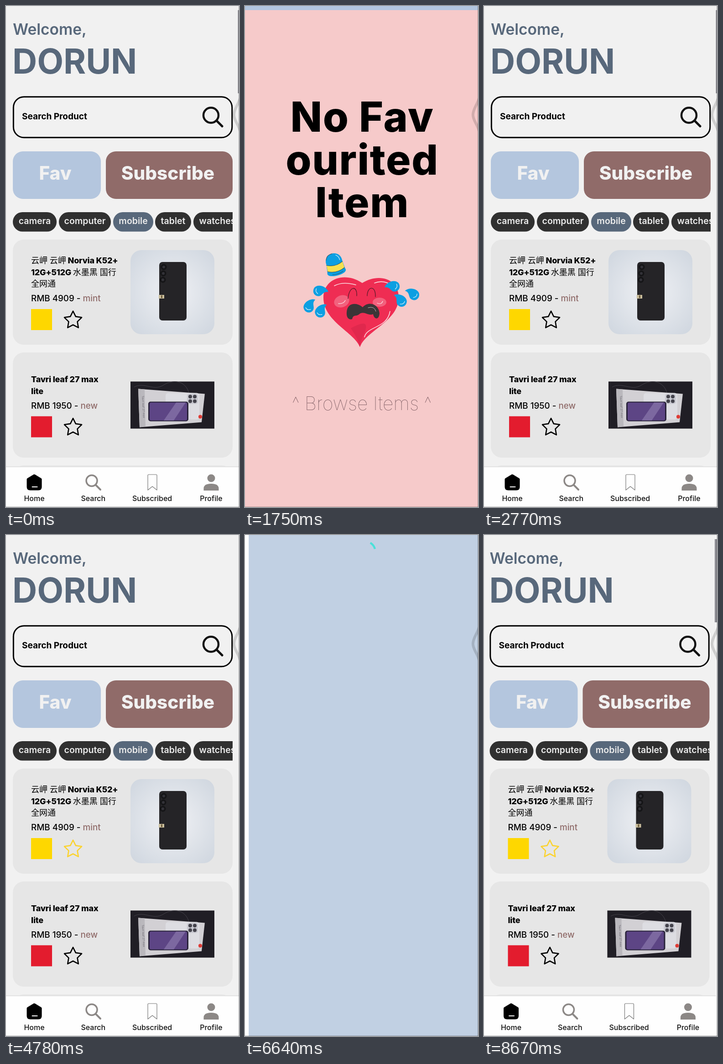
Animation, 511 px wide and 1096 px high, one loop 8740 ms. Source, as an HTML page:

```html
<!DOCTYPE html>
<html lang="en">
<head>
<meta charset="utf-8">
<style>
html, body { margin: 0; width: 100%; height: 100%; overflow: hidden; background: #fff; }
svg { display: block; font-family: Inter, "Noto Sans CJK SC", "Noto Sans CJK", sans-serif; }
.mid { text-anchor: middle; }
.headline { text-anchor: middle; letter-spacing: 1.5px; }
.title { font-size: 18px; font-weight: 800; letter-spacing: -.2px; }
.cjk { font-weight: 500; letter-spacing: 0; }
.price { font-size: 18.8px; font-weight: 500; }
.line { fill: none; stroke-linecap: round; stroke-linejoin: round; }
</style>
</head>
<body>
<svg id="stage" width="511" height="1096" viewBox="0 0 511 1096"></svg>
<script>
const LOOP = 8740, SLIDE = 51.1, SLIDE_MS = 450;

const rect = (x, y, w, h, r, fill, more = '') =>
  `<rect x="${x}" y="${y}" width="${w}" height="${h}" rx="${r}" fill="${fill}" ${more}/>`;
const text = (x, y, size, weight, fill, s, cls = '') =>
  `<text x="${x}" y="${y}" font-size="${size}" font-weight="${weight}" fill="${fill}" class="${cls}">${s}</text>`;
const path = (d, stroke, width) =>
  `<path class="line" d="${d}" stroke="${stroke}" stroke-width="${width}"/>`;
const fillPath = (d, fill) => `<path d="${d}" fill="${fill}"/>`;
const dot = (x, y, r, fill) => `<circle cx="${x}" cy="${y}" r="${r}" fill="${fill}"/>`;
const at = (x, y, s, more = '') => `<g transform="translate(${x} ${y}) ${more}">${s}</g>`;
const cjk = s => `<tspan class="cjk">${s}</tspan>`;

function star(id) {
  const points = Array.from({ length: 10 }, (_, i) => {
    const a = i * Math.PI / 5, r = i % 2 ? 10 : 20;
    return `${r * Math.sin(a)},${-r * Math.cos(a)}`;
  });
  return `<polygon id="${id}" class="line" points="${points.join(' ')}" stroke="#000" stroke-width="2.6"/>`;
}

const blackPhone = rect(0, 0, 184, 184, 24, 'url(#studio)') + rect(63, 26, 60, 128, 7, '#252427') +
  [37, 51, 65].map((y, i) => dot(73 - i, y, 6.5, '#151517') + dot(73 - i, y, 3, '#333238')).join('') +
  rect(62, 98, 12, 8, 0, '#c9bd9c') + rect(67, 99, 3, 6, 0, '#6b5a3a');

const boxedPhone = rect(0, 0, 184, 103, 0, '#201e25') +
  path('M8 12C30 0 50 22 72 8S120 -2 128 24', '#45424a', 1) +
  fillPath('M17 16L163 27L156 89L20 100Z', '#d2d0d4') + fillPath('M17 16L31 17L33 98L20 100Z', '#bab8bd') +
  rect(77, 25, 74, 58, 6, '#dddde2') + rect(124, 27, 24, 22, 5, '#c8c8d0') +
  [[131, 33], [141, 33], [131, 43], [141, 43]].map(([x, y]) => dot(x, y, 4, '#44434c')).join('') +
  rect(39, 44, 88, 43, 5, '#29233a') + rect(42, 46, 82, 39, 3, '#5d4585') +
  fillPath('M73 85L100 46H121L95 85Z', '#7c68a0') + dot(153, 77, 4, '#df3b35') +
  at(25, 31, text(0, 0, 6, 500, '#77747c', 'Tavri leaf 27 max'), 'rotate(87)');

const price = (x, y, amount, state) =>
  `<text class="price" x="${x}" y="${y}">RMB ${amount} - <tspan fill="#8f6b69">${state}</tspan></text>`;

function card(y, lines, amount, state, shop, id, photo) {
  const end = 52 + 25.5 * lines.length + (lines.length < 3 ? 13 : 0);
  const title = lines.map((s, i) =>
    `<text class="title" x="55" y="${end - 25.5 * (lines.length - i)}">${s}</text>`).join('');
  return at(0, y, rect(15, 0, 482, 230, 24, '#e6e6e6') + title + price(55, end + 6.5, amount, state) +
    rect(55, end + 23.5, 46, 46, 0, shop) + at(147, end + 48, star(id)) + photo);
}

const mainTitle = [`${cjk('云岬 云岬')} Norvia K52+`, `12G+512G ${cjk('水墨黑 国行')}`, cjk('全网通')];

const pills = [['camera', 15, 96], ['computer', 116, 114], ['mobile', 235, 88], ['tablet', 327, 79], ['watches', 411, 105]]
  .map(([s, x, w]) => rect(x, 451, w, 42.5, 21, s == 'mobile' ? '#58687b' : '#303030') +
    text(x + w / 2, 477, 19.5, 600, '#ececec', s, 'mid')).join('');

const tabs = ['Home', 'Search', 'Subscribed', 'Profile']
  .map((s, i) => text(62 + i * 129.3, 1083, 16, 500, '#111', s, 'mid')).join('');

const home = rect(0, 0, 511, 1096, 0, '#f1f1f1') +
  text(15, 63, 33.5, 600, '#58687b', 'Welcome,') +
  text(14, 148, 75, 700, '#58687b', 'DORUN') +
  rect(16.3, 198.8, 479.5, 89, 23, '#f1f1f1', 'stroke="#000" stroke-width="3"') +
  text(35, 248, 19, 700, '#000', 'Search Product') +
  '<circle cx="449.500" cy="239" r="16.500" fill="none" stroke="#111" stroke-width="4.500"/>' +
  path('M462 251L474 263', '#111', 5) +
  `<g id="fav">${rect(15, 318, 193, 104, 22, '#b4c6de')}${text(108, 380, 40.5, 800, '#f1f1f1', 'Fav', 'mid')}</g>` +
  rect(219, 318, 278, 104, 22, '#906b69') + text(355, 380, 40.5, 800, '#f1f1f1', 'Subscribe', 'mid') +
  `<g clip-path="url(#row)">${pills}</g>` +
  card(511, mainTitle, 4909, 'mint', '#fed700', 'star', at(273, 23, blackPhone)) +
  card(758, ['Tavri leaf 27 max', 'lite'], 1950, 'new', '#e31c2e', 'star2', at(273, 63.5, boxedPhone)) +
  rect(15, 1005, 482, 230, 24, '#e6e6e6') +
  rect(0, 1007, 511, 2, 0, '#e3e3e3') + rect(0, 1009, 511, 87, 0, '#fefefe') +
  path('M62 1027L76 1035.500V1052Q76 1057 71 1057H53Q48 1057 48 1052V1035.500Z', '#000', 5) +
  fillPath('M62 1027L76 1035V1057H48V1035Z', '#000') + path('M57.500 1052H68.500', '#fff', 2) +
  '<circle cx="188" cy="1038.500" r="12" fill="none" stroke="#8c8886" stroke-width="3.500"/>' +
  path('M197 1048L207 1058', '#8c8886', 4) +
  path('M311 1027Q311 1025 313 1025H329Q331 1025 331 1027V1059L321 1051L311 1059Z', '#777', 1.2) +
  dot(450, 1033, 8.5, '#8c8886') + fillPath('M433.500 1060V1055Q434 1045 450 1045T466.500 1055V1060Z', '#8c8886') +
  tabs + rect(508.5, 9, 5, 182, 0, '#8e8e94', 'id="bar"');

// side is 1 for drops flying right, -1 for drops flying left.
const tear = (x, y, angle, side) => at(x, y,
  fillPath('M-15 -7C-8 -14 9 -12 12 -2C14 8 4 14 -3 9C-9 5 -5 -4 -15 -7Z', '#0b9fe2') +
  path('M1 6Q8 5 8 -1', '#bfe6f7', 1.2), `scale(${side * 1.15} 1.15) rotate(${angle})`);

const heart =
  fillPath('M252 746C240 714 172 690 172 638C172 597 218 580 257 606C294 583 339 597 337 640C335 690 266 710 252 746Z', '#ef2d53') +
  fillPath('M232 705C260 690 272 690 262 715C256 728 253 735 252 746C248 730 241 718 232 705Z', '#e0284d') +
  path('M196 612Q215 602 243 610M284 606Q304 598 324 612M262 724C268 700 312 705 318 668', '#fbdde2', 1.6) +
  '<ellipse cx="212" cy="646" rx="17" ry="13" fill="#f2617d" transform="rotate(-20 212 646)"/>' +
  '<ellipse cx="295" cy="648" rx="15" ry="10" fill="#f2617d"/>' +
  path('M205 651Q216 652 220 644M290 650Q299 654 302 646', '#fbdde2', 1.3) +
  path('M226 640C228 612 247 611 245 634M268 634C268 613 287 610 286 636', '#5f1c2c', 1.4) +
  fillPath('M223 670C224 648 246 648 258 659C270 645 293 651 295 672C294 688 283 686 281 674C271 679 262 667 252 673C244 681 238 673 235 685C227 687 222 681 223 670Z', '#3b3537') +
  path('M270 660Q284 656 287 668', '#bbb', 1) +
  tear(325, 614, -30, 1) + tear(341, 645, 15, 1) + tear(368, 631, 0, 1) +
  tear(164, 624, -30, -1) + tear(142, 657, 25, -1) + tear(167, 668, 25, -1) +
  at(197, 566,
    fillPath('M-18 -5C-20 -32 20 -32 18 -5L20 13C28 28 -28 28 -20 13Z', '#0b9fe2') +
    fillPath('M-18 -3Q0 6 18 -3L19 11Q0 20 -19 11Z', '#f6e04f') +
    path('M-18 -3Q0 6 18 -3M-19 11Q0 20 19 11M-16 -14Q-13 -25 0 -25M-10 20Q2 23 14 18', '#38505c', 1) +
    path('M7 -20Q13 -16 13 -8', '#bfe6f7', 1.5), 'rotate(-14)');

const headline = ['No Fav', 'ourited', 'Item']
  .map((s, i) => text(257, 275 + i * 93.5, 91, 800, '#000', s, 'headline')).join('');

const page = rect(0, 0, 520, 1096, 0, '#b2c5dd') +
  '<g id="spinner"><path class="line" style="stroke-linecap:butt" d="M11 -19A22 22 0 0 1 21.300 -5.700" stroke="#1fdad0" stroke-width="4.500"/></g>' +
  `<g id="empty">${rect(-3, 0, 520, 9, 0, '#b2c5de')}${rect(-3, 9, 520, 1087, 0, '#f6caca')}${headline}` +
  `${text(256, 884, 41, 100, '#7d5c62', '^ Browse Items ^', 'mid')}<g id="heart">${heart}</g></g>` +
  `<g id="list">${rect(15, 24, 482, 458, 24, '#e6e6e6')}` +
  `<text class="title" x="30" y="87">${mainTitle[0]} ${mainTitle[1]}</text>` +
  `<text class="title" x="30" y="112">${mainTitle[2]}</text>${price(30, 145, 4909, 'mint')}` +
  `${rect(30, 180, 46, 46, 0, '#fed700')}${at(209, 190, blackPhone, 'scale(1.44)')}</g>`;

document.getElementById('stage').innerHTML =
  '<defs><radialGradient id="studio" r=".7"><stop offset=".3" stop-color="#e6e9ee"/><stop offset="1" stop-color="#cfd6df"/></radialGradient>' +
  `<clipPath id="row">${rect(0, 440, 497, 60, 0, '#000')}</clipPath></defs>` +
  `<g id="home">${home}</g><g id="page">${page}</g>` +
  path('M513 203C508 218 500 226 500 238S508 256 513 272', 'rgba(0,0,0,.15)', 6) +
  rect(510, 0, 1, 1096, 0, 'rgba(0,0,0,.25)') + rect(0, 1095, 511, 1, 0, 'rgba(0,0,0,.25)');

const el = id => document.getElementById(id);
const clamp = v => Math.max(0, Math.min(1, v));
const show = (id, opacity) => {
  el(id).setAttribute('opacity', opacity);
  el(id).setAttribute('visibility', opacity > 0 ? 'visible' : 'hidden');
};
const shift = (id, x) => el(id).setAttribute('transform', `translate(${x} 0)`);

const cubic = (s, a, b, c, d) =>
  (1 - s) ** 3 * a + 3 * s * (1 - s) ** 2 * b + 3 * s * s * (1 - s) * c + s ** 3 * d;

// Fast start with a long, slow settle: two joined Bezier segments.
function ease(p) {
  const [xs, ys] = p < 1 / 6
    ? [[0, .05, .1333, 1 / 6], [0, 0, .06, .4]]
    : [[1 / 6, .2083, .25, 1], [.4, .82, 1, 1]];
  let lo = 0, hi = 1;
  for (let i = 0; i < 24; i++) {
    const mid = (lo + hi) / 2;
    if (cubic(mid, ...xs) < p) lo = mid; else hi = mid;
  }
  return cubic(lo, ...ys);
}

// [start time, whether the favourites page opens]
const moves = [[-9999, false], [812, true], [2206, false], [6506, true], [8446, false]];

const press = s => s < 0 || s > 400 ? 1 : s < 150 ? 1 - .8 * s / 150 : .2 + .8 * (s - 150) / 250;

function draw(t) {
  const [start, open] = moves.filter(m => m[0] <= t).pop();
  const since = t - start, k = ease(clamp(since / SLIDE_MS));
  const loaded = !open || since >= 160, second = t > 6000;

  shift('home', open ? -SLIDE * k : -SLIDE * (1 - k));
  shift('page', open ? SLIDE * (1 - k) : SLIDE * k);
  show('page', open ? clamp((since - 50) / 106) : 1 - clamp((since - 35) / 83));
  el('home').style.display = open && since >= 100 ? 'none' : '';

  el('empty').style.display = loaded && !second ? '' : 'none';
  el('list').style.display = loaded && second ? '' : 'none';
  el('heart').style.display = open && since < 390 ? 'none' : '';
  el('spinner').style.display = loaded ? 'none' : '';
  el('spinner').setAttribute('transform', `translate(255.5 36) rotate(${(since - 134) * .5})`);

  el('fav').setAttribute('opacity', press(t - 600) * press(t - 6300));
  el('bar').setAttribute('opacity', t > 8000 ? 1 : 1 - clamp((t - 3780) / 330));
  el('star').setAttribute('stroke', t < 4710 ? '#000' : '#fbd32f');
  el('star').setAttribute('opacity', t < 4640 || t >= 4780 ? 1 : t < 4710 ? .4 : .6);
}

const begin = performance.now();
function tick() {
  draw((performance.now() - begin) % LOOP);
  requestAnimationFrame(tick);
}
tick();
</script>
</body>
</html>
```
